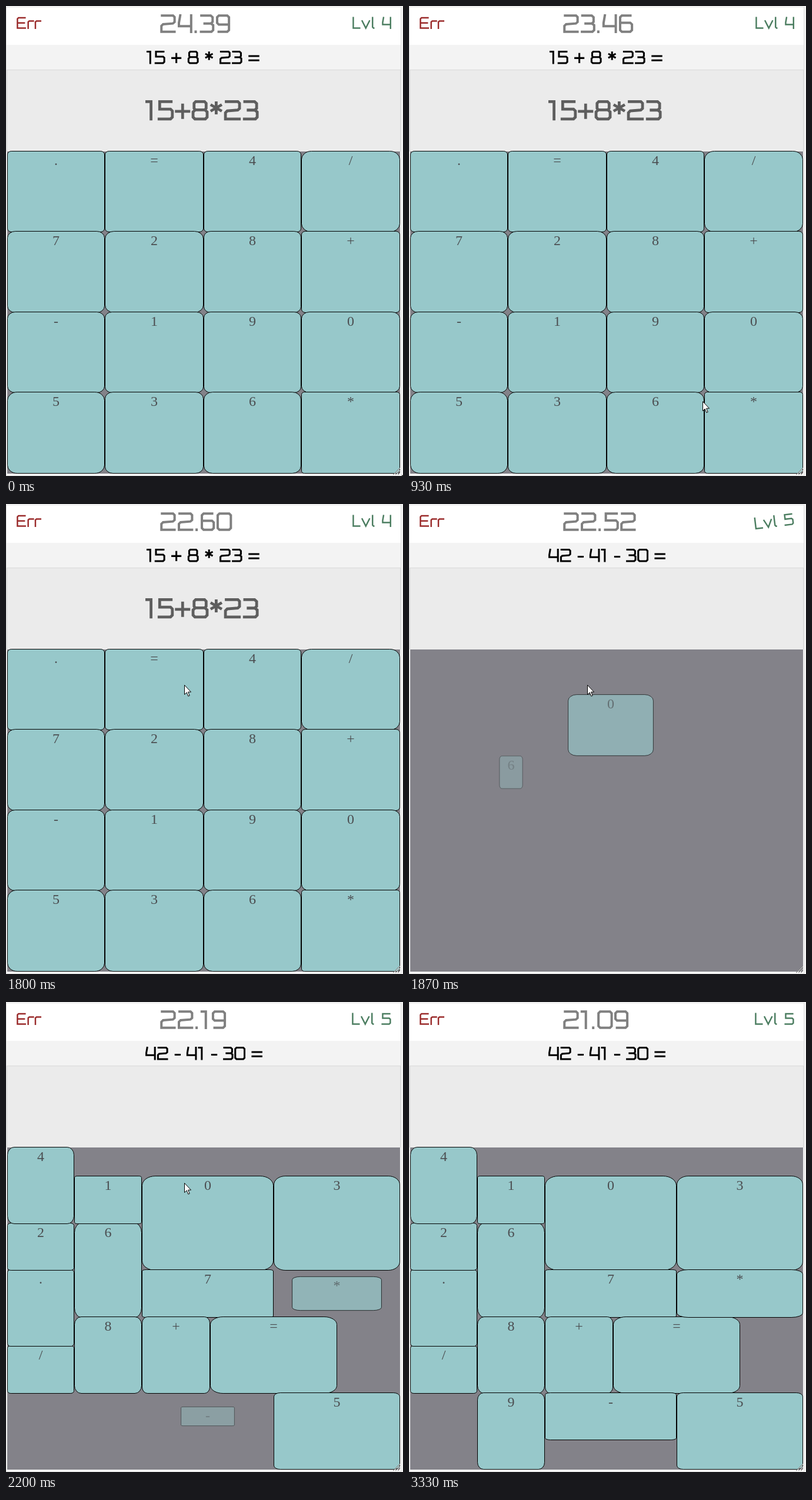
An HTML page with a canvas for the animation above (3390 ms loop, 675 px wide and 798 px high).

```html
<!DOCTYPE html>
<html lang="en">
<head>
<meta charset="utf-8">
<title>Calculator game</title>
<style>
html, body { margin: 0; width: 100%; height: 100%; overflow: hidden; background: #fff; }
canvas { display: block; }
</style>
</head>
<body>
<canvas id="stage" width="675" height="798" role="img" aria-label="Calculator game: 15 + 8 * 23 =, then 42 - 41 - 30 ="></canvas>
<script>
const ctx = document.getElementById('stage').getContext('2d');
const LOOP = 3390, LEVEL_UP = 1870;

// Squared display lettering: advance and centre line, cap height 10.
const GLYPHS = {
  0: [9, 'M1.6 .7H6.8L7.7 1.6V8.4L6.8 9.3H1.6L.7 8.4V1.6Z'],
  1: [5.9, 'M0 .7H2.8V10'],
  2: [9.3, 'M.4 .7H6.9L7.7 1.5V4.1L6.8 4.9L1.6 5.3L.7 6.2V9.3H8.3'],
  3: [8.6, 'M.3 .7H5.9L6.9 1.6V4L6 4.9H2M6 4.9L7.2 5.8V8.4L6.3 9.3H.1'],
  4: [8.8, 'M1.5 0L.7 4.6V6.3H7.2M7.2 0V10'],
  5: [8.8, 'M7.6 .7H1.2V4.4H6.6L7.5 5.3V8.4L6.6 9.3H.2'],
  6: [8.4, 'M6.8 .7H1.6L.7 1.6V8.4L1.6 9.3H6.1L7 8.4V5.4L6.1 4.5H.7'],
  7: [8, 'M0 .7H6.7V2.2L3 10'],
  8: [9, 'M2 .7H6.4L7.2 1.5V4L6.6 4.8L7.7 5.8V8.4L6.8 9.3H1.6L.7 8.4V5.8L1.8 4.8L1.2 4V1.5ZM1.8 4.8H6.6'],
  9: [8.4, 'M.9 9.3H6.1L7 8.4V1.6L6.1 .7H1.6L.7 1.6V4.6L1.6 5.5H7'],
  '.': [2.9, 'M.8 8.6V10'],
  '+': [8.3, 'M0 5.5H7.6M3.8 1.7V9.3'],
  '-': [4.9, 'M0 6H4.6'],
  '*': [7.1, 'M3.2 .6V7M.4 2.2L6 5.4M6 2.2L.4 5.4'],
  '=': [8.6, 'M0 4H8.2M0 7.2H8.2'],
  ' ': [4, ''],
  E: [8.9, 'M7.6 .7H1.6L.7 1.6V9.3H7.8M.7 5H7'],
  r: [6, 'M.7 10V4.2L1.6 3.4H5.6'],
  L: [7.5, 'M.7 0V9.3H6.6'],
  v: [8.5, 'M.3 2.8L3.6 9.3L6.9 2.8'],
  l: [4.4, 'M.7 0V8.4L1.5 9.3H2.3']
};
for (const glyph of Object.values(GLYPHS)) glyph[1] = new Path2D(glyph[1]);

function lettering(text, x, y, scale, color, weight) {
  ctx.save();
  ctx.translate(x, y);
  ctx.scale(scale, scale);
  ctx.strokeStyle = color;
  ctx.lineWidth = weight;
  for (const ch of text) {
    const [advance, path] = GLYPHS[ch];
    ctx.stroke(path);
    ctx.translate(advance, 0);
  }
  ctx.restore();
}

// Each key: label, grid edges (left, top, right, bottom), corner percent.
const evenGrid = { xs: [2, 168, 336, 502, 670], ys: [247, 383, 520, 656, 793] };
const looseGrid = {
  xs: [2, 116, 231, 347, 455, 563, 670],
  ys: [247, 296, 376, 455, 535, 584, 664, 743, 793]
};
const makeKey = (grid, label, [l, t, r, b], round) => ({
  label, round, x: grid.xs[l], y: grid.ys[t] - 1,
  w: grid.xs[r] - grid.xs[l], h: grid.ys[b] - grid.ys[t] + 2
});
const evenRounds = [4, 4, 4, 10, 8, 9, 7, 4, 8, 7, 7, 8, 10, 8, 9, 3];
const evenKeys = [...'.=4/728+-190536*'].map((label, i) => {
  const col = i % 4, row = i >> 2;
  return makeKey(evenGrid, label, [col, row, col + 1, row + 1], evenRounds[i]);
});
// Listed in the order they pop in.
const looseKeys = [
  '0 2143 10', '6 1224 10', '7 2344 3', '8 1426 10', '+ 2436 8', '= 3456 10',
  '/ 0516 5', '. 0315 4', '2 0213 5', '1 1122 4', '4 0012 10', '3 4163 9',
  '5 4668 5', '* 4364 9', '- 2647 4', '9 1628 9'
].map(spec => {
  const [label, edges, round] = spec.split(' ');
  return makeKey(looseGrid, label, [...edges].map(Number), +round);
});

function drawKey({ label, x, y, w, h, round }, size = 1) {
  const kw = w * size, kh = h * size;
  const left = x + (w - kw) / 2, top = y + (h - kh) / 2;
  ctx.save();
  ctx.globalAlpha = size;
  ctx.beginPath();
  ctx.roundRect(left + .5, top + .5, kw - 1, kh - 1, { x: kw * round / 100, y: kh * round / 100 });
  ctx.fillStyle = '#97c8ca';
  ctx.fill();
  ctx.strokeStyle = '#000';
  ctx.lineWidth = 1;
  ctx.stroke();
  ctx.fillStyle = '#4b4d50';
  ctx.font = '24px "Liberation Serif", serif';
  ctx.textAlign = 'center';
  ctx.fillText(label, x + w / 2, top + 23.5);
  ctx.restore();
}

// Linear interpolation through rows of [time, ...values].
function track(rows, t) {
  const next = rows.findIndex(row => row[0] > t);
  if (next < 0) return rows[rows.length - 1].slice(1);
  const a = rows[next - 1], b = rows[next], k = (t - a[0]) / (b[0] - a[0]);
  return a.slice(1).map((v, i) => v + (b[i + 1] - v) * k);
}
const clock = [[0, 24.39], [930, 23.46], [1800, 22.6], [2000, 22.38], [2200, 22.19], [2470, 21.95], [3330, 21.09]];
const pointer = [
  [0, 673, 796], [270, 550, 775], [530, 330, 750], [670, 244, 764], [800, 390, 735],
  [930, 499, 671], [1070, 534, 697], [1130, 538, 680], [1400, 400, 440], [1600, 291, 318],
  [1730, 303, 307], [2270, 303, 307], [2470, 307, 376], [2670, 302, 480],
  [2800, 296, 600], [2930, 289, 734], [3000, 287, 820]
];
const arrow = new Path2D('M.5 .5V16.5L4.2 13L6.8 19.3L9.2 18.3L6.6 12.2H11.5Z');

function rect(x, y, w, h, color) {
  ctx.fillStyle = color;
  ctx.fillRect(x, y, w, h);
}

function drawPanels() {
  rect(0, 0, 675, 798, '#fff');
  rect(672, 0, 3, 798, '#f4f4f4');
  rect(0, 66, 671, 42, '#f3f3f3');
  rect(0, 1, 672, 1, '#ddd');
  rect(0, 1, 1, 797, '#ddd');
  rect(671, 1, 1, 797, '#ddd');
  rect(0, 797, 672, 1, '#ddd');
  rect(1, 108, 670, 139, '#d9d9d9');
  rect(2, 109, 668, 138, '#ebebeb');
  rect(2, 247, 668, 547, '#838289');
}

function drawGrip() {
  ctx.lineWidth = 1;
  for (const [color, shift] of [['#777', 0], ['#ccc', 1]]) {
    ctx.strokeStyle = color;
    ctx.beginPath();
    for (const d of [4, 8, 12]) {
      ctx.moveTo(670 - d + shift, 796);
      ctx.lineTo(670, 796 - d + shift);
    }
    ctx.stroke();
  }
}

function drawLevel(t, levelled) {
  const k = (t - 1830) / 340;
  const swing = levelled && k < 1 ? Math.sin(Math.PI * k) : 0;
  ctx.save();
  ctx.translate(620 - 2 * swing, 29 + 2 * swing);
  ctx.rotate(-swing * Math.PI / 9.4);
  lettering(levelled ? 'Lvl 5' : 'Lvl 4', levelled ? -32 : -31, -10.5, 2.05, '#4b7d60', 1.2);
  ctx.restore();
}

function draw(t) {
  const levelled = t >= LEVEL_UP;
  drawPanels();
  lettering('Err', 18, 18.5, 2.05, '#9a2b2b', 1.2);
  lettering(track(clock, t)[0].toFixed(2), 262, 14, 3.2, '#808080', 1.25);
  drawLevel(t, levelled);
  lettering(levelled ? '42 - 41 - 30 =' : '15 + 8 * 23 =', levelled ? 237 : 239, 76, 2.25, '#000', 1.35);

  if (levelled) {
    looseKeys.forEach((key, i) => {
      const size = Math.min(1, (t - 1816 - 25 * i) / 83);
      if (size > .15) drawKey(key, size);
    });
  } else {
    lettering('15+8*23', 237, 160, 3.42, '#5e5e5e', 1.4);
    evenKeys.forEach(key => drawKey(key));
  }
  drawGrip();

  const [x, y] = track(pointer, t);
  ctx.save();
  ctx.translate(Math.round(x), Math.round(y));
  ctx.fillStyle = '#fff';
  ctx.strokeStyle = '#000';
  ctx.lineWidth = 1;
  ctx.fill(arrow);
  ctx.stroke(arrow);
  ctx.restore();
}

// The picture advances fifteen times a second, on 10 ms ticks.
function tick() {
  const ticks = Math.floor(performance.now() % LOOP / 10);
  const step = Math.floor((ticks + .4) * .15);
  draw(Math.round(step * 20 / 3) * 10);
  requestAnimationFrame(tick);
}
tick();
</script>
</body>
</html>
```
